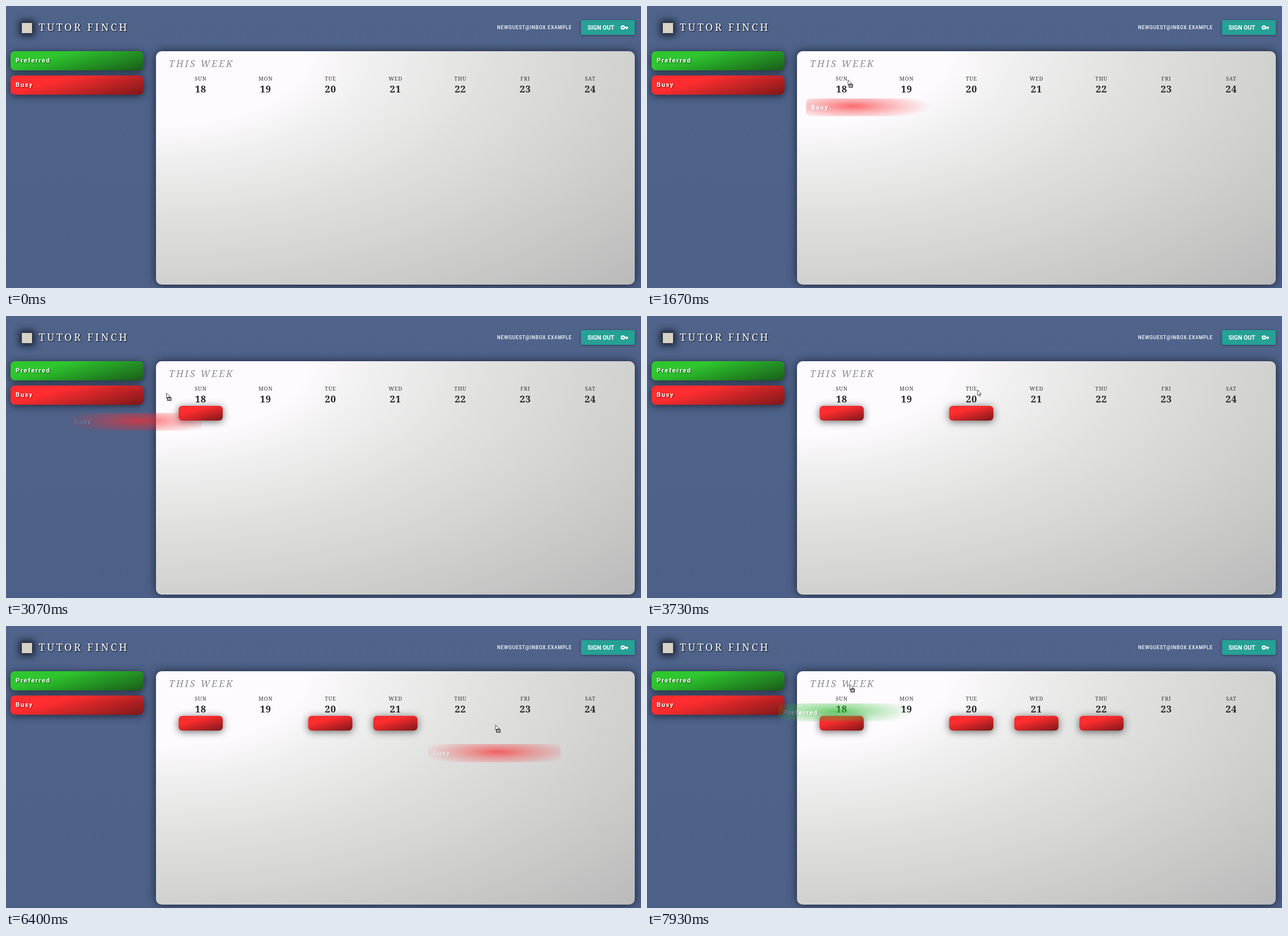
Animation of 1122 by 499 pixels, one loop 8000 ms. Source, as an HTML page:

```html
<!DOCTYPE html>
<html lang="en">
<head>
<meta charset="utf-8">
<title>Weekly planner</title>
<style>
  html, body { margin: 0; width: 100%; height: 100%; overflow: hidden; background: #4e6188; }
  #stage { position: absolute; left: 0; top: 0; width: 1122px; height: 499px; overflow: hidden;
    background: linear-gradient(#4f638b, #4d6088); }
  #stage > * { position: absolute; }
  svg { left: 0; top: 0; overflow: visible; }
  .panel { left: 265px; top: 80px; width: 846px; height: 413px; border-radius: 10px;
    background: radial-gradient(farthest-corner at 0 0,
      #fdfbfe 22%, #f1f0f0 32%, #e0e0df 50%, #d1d1d0 70%, #bababa);
    box-shadow: 0 0 16px rgba(0, 0, 0, .65); }
  .logo { left: 28px; top: 30px; width: 18px; height: 18px; background: #d9d2c4;
    box-shadow: 0 0 12px 5px rgba(0, 0, 0, .62); }
  .button { left: 1016px; top: 25px; width: 95px; height: 26px; border-radius: 2px;
    background: #26a195; box-shadow: 0 1px 4px rgba(0, 0, 0, .4); }
  .card { border-radius: 8px; box-shadow: 0 2px 14px rgba(0, 0, 0, .6); }
  .red { background: linear-gradient(165deg, #ff2d2f 32%, #e0282a 48%, #7e1719); }
  .green { background: linear-gradient(165deg, #2fc62f 30%, #27a827 50%, #1a5c1a); }
  .wide { left: 8px; width: 235px; height: 34px; }
  .event { width: 78px; height: 26px; top: 159px; border-radius: 6px; }
  .card span, .ghost span { position: absolute; left: 9px; top: 9px; color: #fff; white-space: nowrap;
    font: 700 11px/15px Roboto, sans-serif; letter-spacing: 1.65px; text-shadow: 1px 1px 2px rgba(0, 0, 0, .6); }
  .ghost { left: 0; top: 0; width: 235px; height: 32px; border-radius: 8px; }
  .ghost.red { background: #f92c2e; }
  .ghost.green { background: #2cbb2c; }
  .serif { font-family: "Noto Serif", serif; }
  .sans { font-family: Roboto, sans-serif; }
</style>
</head>
<body>
<div id="stage">
  <div class="logo"></div>
  <div class="button"></div>
  <div class="panel"></div>
  <div class="card wide green" style="top:80px"><span>Preferred</span></div>
  <div class="card wide red" style="top:123px"><span>Busy</span></div>
  <svg id="labels" width="1122" height="499">
    <text class="serif" x="58" y="44" font-size="18" font-weight="200" letter-spacing="3.5" fill="#fff"
      style="text-shadow:1px 1px 2px #000">TUTOR FINCH</text>
    <text class="sans" x="999.8" y="41" font-size="8.4" font-weight="500" letter-spacing=".72" fill="#fff"
      text-anchor="end">NEWGUEST@INBOX.EXAMPLE</text>
    <text class="sans" x="1027.5" y="41.5" font-size="10.5" font-weight="700" fill="#fff">SIGN OUT</text>
    <g fill="none" stroke="#fff" stroke-width="2.3">
      <circle cx="1090" cy="38" r="2.7"/>
      <path d="M1092.5 38H1099M1096.8 38V41.3"/>
    </g>
    <text class="serif" x="288" y="108" font-size="16" font-style="italic" font-weight="300"
      letter-spacing="2.9" fill="#8b8b8b">THIS WEEK</text>
  </svg>
  <div id="ghost" class="ghost"><span></span></div>
  <svg id="cursor" width="1" height="1">
    <path d="M0 0V9.5L2.2 7.5 3.8 11 5.2 10.4 3.7 7H6.8Z" fill="#fff" stroke="#222" stroke-width=".8"/>
    <g id="badge"><rect x="2" y="8" width="6" height="5" fill="#fff" stroke="#111" stroke-width="1.2"/>
      <path d="M3.5 10.5H6.5" stroke="#111"/></g>
  </svg>
</div>
<script>
const LOOP = 8000, LAG = 60, REST = 190;
const $ = id => document.getElementById(id);
const stage = $("stage"), labels = $("labels"), ghost = $("ghost"), cursor = $("cursor");
const ghostLabel = ghost.firstElementChild;
const dayX = day => 343.7 + day * 114.72;

function addText(x, y, content, size, weight, spacing, fill) {
  const text = document.createElementNS("http://www.w3.org/2000/svg", "text");
  const attrs = { class: "serif", x: x + spacing / 2, y, "font-size": size, "font-weight": weight,
    "letter-spacing": spacing, fill, "text-anchor": "middle" };
  for (const key in attrs) text.setAttribute(key, attrs[key]);
  text.textContent = content;
  labels.append(text);
}

["SUN", "MON", "TUE", "WED", "THU", "FRI", "SAT"].forEach((name, day) => {
  addText(dayX(day), 132, name, 9.3, 400, .7, "#333");
  addText(dayX(day), 153, 18 + day, 16.5, 700, .8, "#222");
});

const kinds = { red: { label: "Busy", y: 139 }, green: { label: "Preferred", y: 97 } };

// Each drag picks a card up at `grab` px from its left edge and drops it on a day;
// the pointer may pause at `hover` before it and at `via` on the way.
const drags = [
  { kind: "red", grab: 83, start: 480, via: { time: 1080, x: 430, y: 98 }, drop: 1760, day: 0 },
  { kind: "red", grab: 125, start: 2800, hover: { time: 2540, x: 181, y: 97 }, drop: 3560, day: 2 },
  { kind: "red", grab: 129, start: 4600, via: { time: 5080, x: 666, y: 130 }, drop: 5370, day: 3 },
  { kind: "red", grab: 124, start: 5850, via: { time: 6410, x: 865, y: 175 }, drop: 6700, day: 4 },
  { kind: "green", grab: 102, start: 7500, via: { time: 8060, x: 372, y: 104 }, drop: 8400, day: 0 }
];

// The pointer arrives at a stop, rests there, then eases to the next one.
const stop = (arrive, leave, x, y) => ({ arrive, leave, x, y });
const pause = ({ time, x, y }) => stop(time - LAG, time, x, y);
const stops = [stop(70, 70, 250, 190)];
for (const { kind, grab, start, hover, via, drop, day } of drags) {
  if (hover) stops.push(pause(hover));
  stops.push(stop(start - LAG, start, grab + 8, kinds[kind].y));
  if (via) stops.push(pause(via));
  stops.push(stop(drop - LAG, drop + REST, dayX(day) + 11, 131));
}

function pointerAt(time) {
  const next = stops.findIndex(s => s.leave > time), to = stops[next], from = stops[next - 1] || to;
  const u = Math.min(1, Math.max(0, (time - from.leave) / (to.arrive - from.leave)));
  const k = u * u * (3 - 2 * u);
  return [from.x + (to.x - from.x) * k, from.y + (to.y - from.y) * k];
}

const events = drags.map(({ kind, day, drop }) => {
  const node = document.createElement("div");
  node.className = "card event " + kind;
  node.style.left = dayX(day) - 38.7 + "px";
  stage.insertBefore(node, ghost);
  return { node, drop };
});

const show = (node, visible) => { node.style.display = visible ? "" : "none"; };

function placeGhost(time, { grab, kind }) {
  const [x, y] = pointerAt(time - LAG);
  const mask = `radial-gradient(138px 25px at ${grab}px 14px,
    rgba(0,0,0,.7), rgba(0,0,0,.42) 35%, rgba(0,0,0,.19) 70%, transparent)`;
  ghost.className = "ghost " + kind;
  ghostLabel.textContent = kinds[kind].label;
  ghost.style.maskImage = ghost.style.webkitMaskImage = mask;
  ghost.style.transform = `translate(${x + 5 - grab}px, ${y + 34}px)`;
}

function draw(time) {
  const drag = drags.find(({ start, drop }) => time >= start && time < drop);
  const [x, y] = pointerAt(time);
  cursor.style.transform = `translate(${x}px, ${y}px)`;
  show(cursor, time >= stops[0].leave);
  show($("badge"), drag);
  show(ghost, drag);
  if (drag) placeGhost(time, drag);
  for (const { node, drop } of events) show(node, time >= drop);
}

const began = performance.now();
function frame() {
  draw((performance.now() - began) % LOOP);
  requestAnimationFrame(frame);
}
frame();
</script>
</body>
</html>
```
